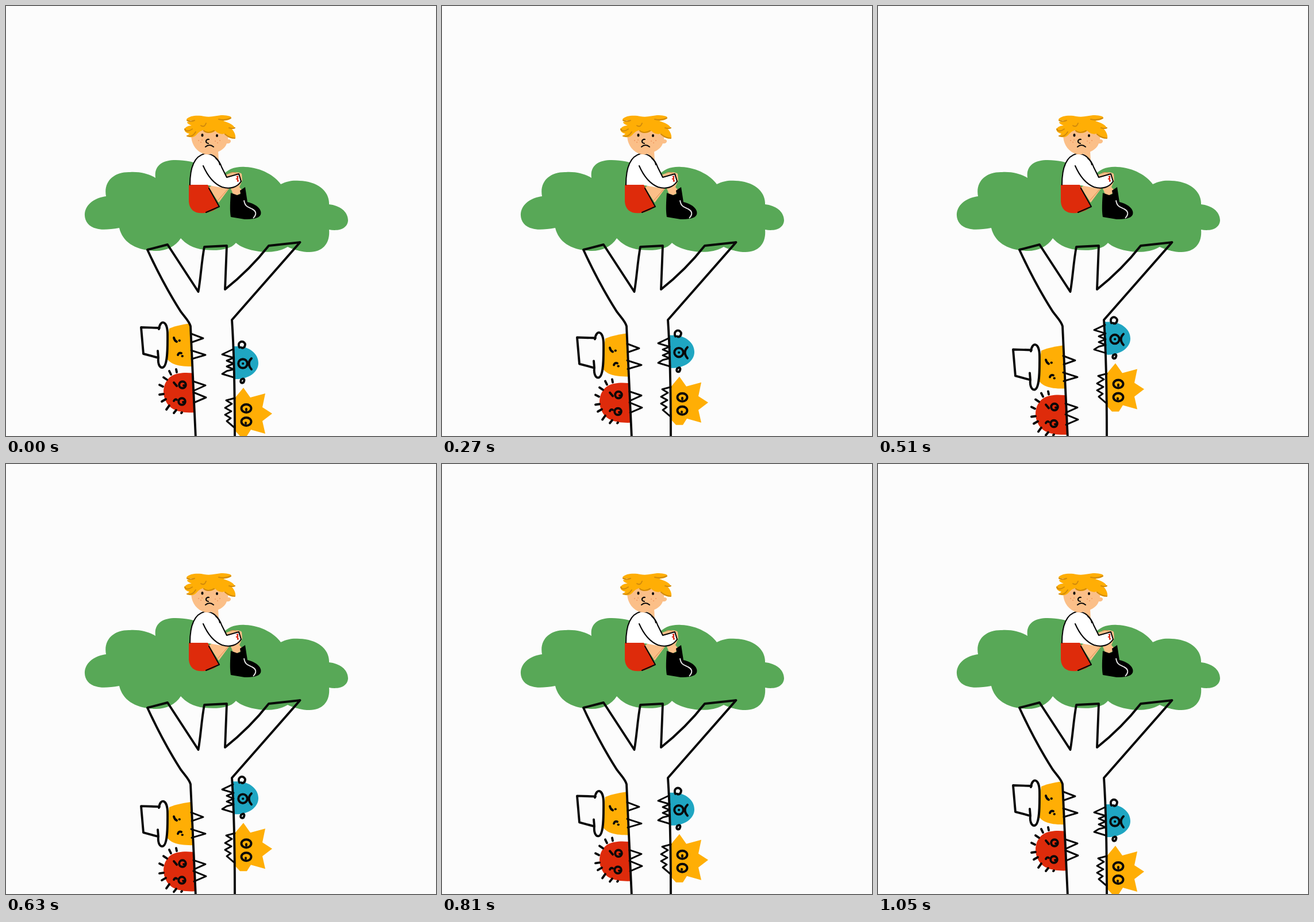
An HTML page that plays this animation: 748x748 px, repeating every 1080 ms.

```html
<!DOCTYPE html>
<html lang="en">
<head>
<meta charset="utf-8">
<title>Up the tree</title>
<style>
  html, body { margin: 0; width: 100%; height: 100%; overflow: hidden; background: #fcfcfc; }
  svg { display: block; width: 100vw; height: 100vh; }
  .ink { fill: none; stroke: #080808; stroke-width: 3.9; stroke-linecap: round; stroke-linejoin: round; }
  .fine { stroke-width: 2.1; }
  .teeth { stroke-width: 3; }
  .paper { fill: #fcfcfc; }
  .strand { fill: none; stroke: #d18a0c; stroke-width: 2; stroke-linecap: round; }
  .skin { fill: #fbbf88; }
  .sun { fill: #ffae05; }
  .red { fill: #de2b0b; }
</style>
</head>
<body>
<svg viewBox="0 0 748 748">
  <defs>
    <path id="trunk" d="M330 752L321 557C319 548 308 538 303 530C282 497 262 459 246 424L281 415L334.500 497C339 472 340 445 345 419L384 417L381 493C410 470 435 445 457 417L511.500 411L393 546C396 590 398 640 398 752"/>
  </defs>

  <g class="left">
    <path class="sun" d="M330 551C310 553 296 556 284 561L277 610C286 623 297 628 330 627Z"/>
    <path class="ink paper" d="M267 560L235 559L239 605L265 612C264 620 266 629 272 629C282 628 281 590 281 571C281 546 268 545 266 562M264 600L265 612"/>
    <path class="ink" d="M292 577Q293 582 297 584M301.500 582h.5M299 607Q301 602 305 604M306.500 609h.5"/>
    <path class="red" d="M334 640C318 637 300 637 289 643C274 652 271 671 277 685C284 703 302 709 334 707Z"/>
    <path class="ink" d="M296 632L297 637M284 635L287 641M274 646L280 650M267 659L273 662M267 676L274 675M271 688L278 684M279 702L284 695M292 708L296 703M305 708L306 707"/>
    <g class="ink">
      <circle cx="307" cy="659" r="5.800"/><circle cx="306" cy="688" r="5.800"/>
      <path d="M292 655L297 661M292 687Q294 683 297 685M309 660h.5M308 689h.5"/>
    </g>
  </g>

  <g class="right">
    <path fill="#1fa6c2" d="M388 592H400C422 591 439 604 439 621C439 638 420 650 398 649H388Z"/>
    <path class="ink" d="M406 594C401 584 413 580 416 588C416 594 412 596 409 594M409 650C414 646 416 650 413 655C409 657 407 654 409 650"/>
    <circle class="ink" cx="412" cy="622" r="7.800"/>
    <path class="ink" d="M412 622h.3M427 613C421 619 421 625 427 632"/>
    <path class="sun" d="M388 688L398 682L413 664L425 681L451 674L446 698L463 709L446 722L451 744L426 737L419 748L407 748L396 736L388 730Z"/>
    <g class="ink">
      <ellipse cx="418" cy="700" rx="8.500" ry="7"/><ellipse cx="418" cy="723" rx="8.500" ry="7"/>
      <path d="M418 701v2M417 725v1"/>
    </g>
  </g>

  <use href="#trunk" class="paper"/>
  <path fill="#58a857" d="M174 331C169 304 189 288 216 289C235 288 250 293 260 299C257 277 273 268 295 268C330 268 360 283 375 297C385 283 400 279 416 280C445 281 468 296 478 310C490 304 500 303 510 304C542 305 563 322 562 345C580 347 595 357 595 373C594 388 578 392 562 389C564 412 552 428 528 428C515 428 500 424 490 419C475 428 455 429 440 427C420 424 408 419 400 412C390 425 365 426 345 424C325 422 312 413 304 404C295 418 280 426 260 426C225 425 203 411 197 386C180 389 165 390 157 387C144 384 136 374 137 361C139 343 157 333 174 331Z"/>
  <use href="#trunk" class="ink"/>

  <g class="left">
    <path class="ink teeth" d="M322 570L343 578L323 585M322 599L347 607L323 614M326 653L347 660L327 669M326 672L348 681L327 690"/>
  </g>
  <g class="right">
    <path class="ink teeth" d="M395 597L376 606L396 612L384 617L396 622L384 627L396 632L384 635L376 640L396 646"/>
    <path class="ink teeth" d="M398 682L383 686L393 692L381 699L392 705L381 711L391 717L384 722L398 734"/>
  </g>

  <g id="boy">
    <path class="skin" d="M353 316L384 293Q403 286 410 292L411 303L406 315L413 323L397 332L390 315L370 342Z"/>
    <path fill="none" stroke="#d98b50" d="M388 316L366 341M390 290Q398 288 404 293"/>
    <path d="M391 325L402 329L408 327L407 321L416 315L420 341C437 345 446 355 443 363C440 370 428 371 415 371L391 367C389 355 390 340 391 325Z"/>
    <path fill="none" stroke="#ddd" stroke-width="2" d="M414 338C416 350 421 349 428 353C436 357 436 363 430 369"/>
    <path class="skin" d="M357 252L369 252L370 269L360 265Z"/>
    <path fill="#fff" d="M320 312C320 285 326 262 345 257C360 255 371 268 375 280L384 298L405 292L409 305C402 316 389 319 376 316L353 312Z"/>
    <path class="red" d="M318 311H351L371 349C365 354 357 358 346 360C330 362 319 356 318 340Z"/>
    <path class="ink fine" d="M320 311C320 285 326 262 345 257C360 255 371 268 375 280L384 298L405 292L409 305C402 316 389 319 376 315C361 309 350 294 343 278M365 265Q371 270 372 276M353 317L371 349L348 359"/>
    <path fill="none" stroke="#dc2a18" stroke-width="2.200" d="M401 297l3-1M400 301l4-1M402 305l3-1M403 296v9"/>
    <path class="skin" d="M323 216C320 232 325 248 341 256Q349 260 358 257C371 255 382 247 384 239C392 241 394 231 386 232L388 215Z"/>
    <path class="sun" d="M314 197C320 190 335 190 345 192C356 194 365 191 374 190C383 190 391 191 392 194C391 198 383 199 378 200C388 203 396 207 398 212L392 213C397 218 400 225 399 230C392 232 386 229 380 222C374 224 368 221 364 217C358 223 347 222 343 216C339 217 336 219 333 222C328 229 321 230 315 226L319 222C312 221 309 216 311 213C314 209 319 208 323 208C318 206 315 204 315 202L327 199C321 199 314 200 314 197Z"/>
    <path class="strand" d="M315 199Q321 202 328 199M311 214Q314 221 324 214M315 226Q324 229 330 219M339 208Q345 212 348 204M344 217Q351 223 362 217M370 197Q381 200 391 195M381 223Q389 230 398 230M388 212Q394 214 398 212"/>
    <path class="ink fine" d="M353 232C347 231 346 238 352 239M347 245Q354 239 361 245"/>
    <path class="ink" d="M341.500 224v1.500M367 225v1"/>
    <path fill="none" stroke="#e8793f" stroke-width="1.500" stroke-linecap="round" d="M335 234h.1M339 237h.1M341 233h.1M364 235h.1M368 238h.1M372 234h.1"/>
  </g>
</svg>
<script>
  const LOOP = 1080, STEP = 30;
  const START = 30, PEAK = 545, END = 1055;
  const left = document.querySelectorAll('.left');
  const right = document.querySelectorAll('.right');

  function ease(u) {
    u = Math.min(1, Math.max(0, u));
    return u * u * (3 - 2 * u);
  }

  function move(parts, y) {
    for (const part of parts) part.setAttribute('transform', `translate(0 ${y.toFixed(2)})`);
  }

  function draw(now) {
    const t = Math.floor((now % LOOP) / STEP) * STEP;
    const p = t < PEAK
      ? ease((t - START) / (PEAK - START))
      : ease((END - t) / (END - PEAK));
    move(left, 39 * p);
    move(right, -43 * p);
  }

  let origin;
  function tick(now) {
    origin ??= now;
    draw(now - origin);
    requestAnimationFrame(tick);
  }
  draw(0);
  requestAnimationFrame(tick);
</script>
</body>
</html>
```
